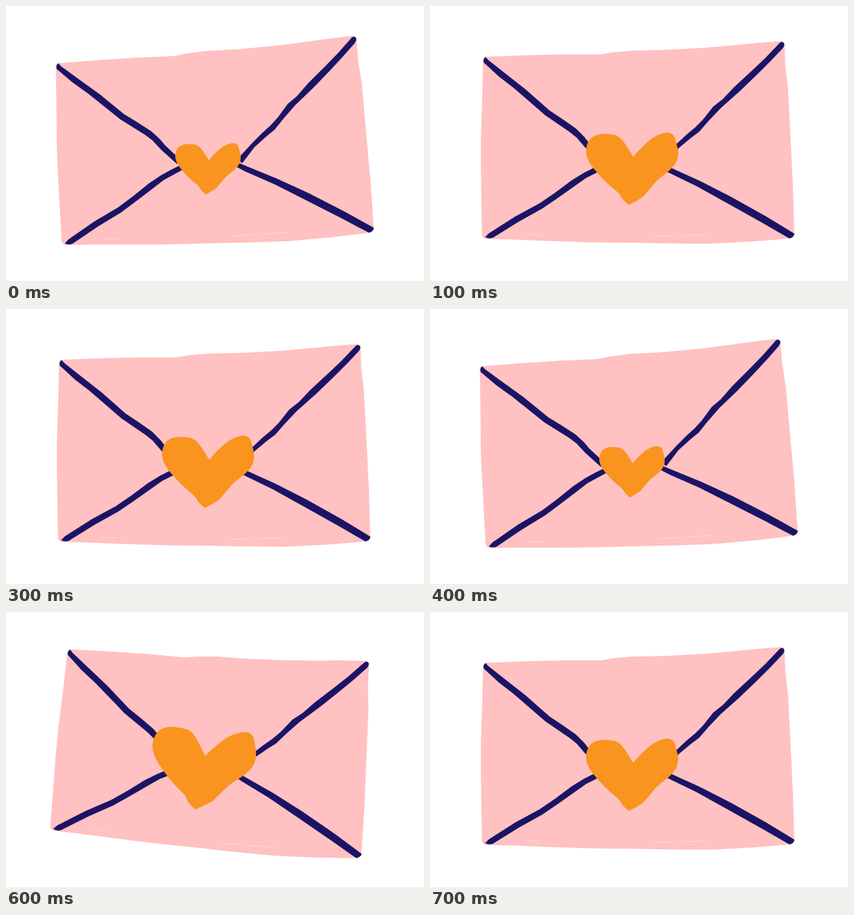
An HTML page that plays this animation: 600x395 px, repeating every 800 ms.

```html
<!DOCTYPE html>
<html lang="en">
<head>
<meta charset="utf-8">
<title>Love letter</title>
<style>
  html, body { margin: 0; width: 100%; height: 100%; overflow: hidden; background: #fff; }
  svg { display: block; width: 100%; height: 100%; }
</style>
</head>
<body>
<svg viewBox="0 0 600 395">
  <g id="envelope">
    <path fill="#ffc1c1" d="M79 73 L130 71 190 69.500 245 69.500 262 66.500 290 64 340 63 395 60 440 56 470 53 503 50.500 Q508 51 509 58
      L510 85 514 120 516 160 518 200 521 260 523 329 Q520 333 510 334.500
      L460 338.500 400 341.500 340 341 290 340 230 339.500 170 337.500 120 335.500 82 334.500 Q75 334 74.500 328
      L74 290 73 230 73 190 75 130 76 80 Q76 75 79 73Z"/>
    <g fill="none" stroke="#fff" stroke-opacity=".4">
      <path d="M138 328 L159 329 M320 331 L352 330 M362 330 L398 329"/>
    </g>
    <g fill="#1b1464">
      <path d="M77 81 Q76 75 80 73.500 L83.500 77.500 109.500 98 137.500 120 171.500 150 189.500 162 209.500 176 221.500 188 228.500 197 249 218
        L244.500 224.500 222.500 203 210.500 189 200.500 181 165.500 157 150.500 144 120.500 118 98.500 101Z"/>
      <path d="M502 53 Q505 50 508 53 Q510 56 506 61 L489.500 78.500 469.500 98.500 444.500 122.500 417.500 146.500 399.500 165.500 386.500 180.500 374.500 189.500 356.500 204.500 338 227
        L331 221 353.500 198.500 368.500 184.500 380.500 174.500 391.500 163.500 406.500 144.500 420.500 133.500 436.500 116.500 462.500 92.500 481.500 74.500Z"/>
      <path d="M79 332 L84.500 326.500 122.500 302.300 157.500 283.300 179.500 268.300 203.500 250.300 221.500 239.300 235.500 232.300 250 226
        L252 233 238.500 239.700 224.500 246.700 207.500 258.700 183.500 275.700 161.500 290.700 127.500 309.700 90 333 Q84 335 79 332Z"/>
      <path d="M332 226 L345 232 387 251 432 274 482 302 523 327 Q523 332 516 334 L478 312 428 284 383 259 342 239 330 232Z"/>
    </g>
  </g>
  <path id="heart" fill="#f9941f" d="M0 0 C5 -7 13 -15 22 -23 C30 -30 40 -34 48 -35 C56 -35 60 -30 61 -22
    C63 -15 65 -8 64 -2 C63 7 59 12 52 19 C44 26 38 30 32 36 C26 43 21 49 16 55 C10 61 0 65 -4 68
    Q-6 70 -9 67 C-12 64 -15 62 -17 59 C-19 54 -22 51 -27 47 C-36 40 -48 28 -56 18 C-63 10 -68 0 -68 -8
    C-68 -19 -63 -28 -54 -31 C-47 -34 -32 -33 -25 -31 C-15 -27 -8 -12 0 0Z"/>
</svg>
<script>
  const envelope = document.getElementById('envelope');
  const heart = document.getElementById('heart');

  // tilt and drop of the envelope; position, turn and size of the heart
  const small = { tilt: -2.25, drop: 0.5, x: 291.3, y: 221.6, turn: -0.2, size: 0.71 };
  const medium = { tilt: 0, drop: 0, x: 292, y: 216.7, turn: 0, size: 1 };
  const large = { tilt: 5.25, drop: 0, x: 286, y: 206.7, turn: 5.5, size: 1.13 };
  const beat = [small, medium, large, medium];
  const stepMs = 100;

  function draw(now) {
    const p = beat[Math.floor(now / stepMs) % beat.length];
    envelope.setAttribute('transform', `translate(0 ${p.drop}) rotate(${p.tilt} 296.5 198.5)`);
    heart.setAttribute('transform', `translate(${p.x} ${p.y}) rotate(${p.turn}) scale(${p.size})`);
  }

  let start;
  function tick(now) {
    start ??= now;
    draw(now - start);
    requestAnimationFrame(tick);
  }
  draw(0);
  requestAnimationFrame(tick);
</script>
</body>
</html>
```
